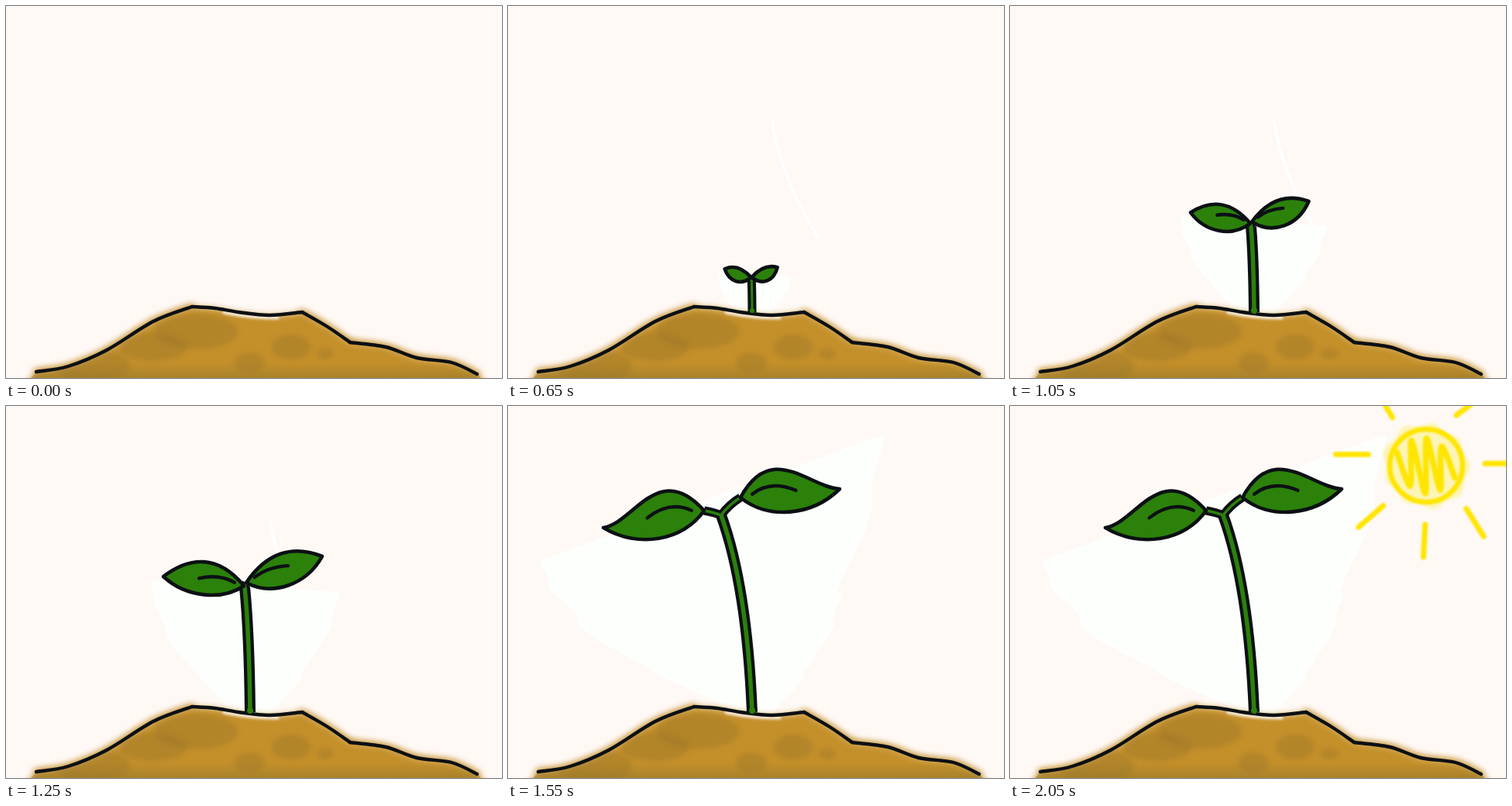
Animation, 640 px wide and 480 px high, one loop 3.05 s. Source, as an HTML page with a canvas:

```html
<!DOCTYPE html>
<html lang="en">
<head>
<meta charset="utf-8">
<title>Growing sprout</title>
<style>
html, body { margin: 0; width: 100%; height: 100%; overflow: hidden; background: #fff9f6; }
canvas { display: block; }
</style>
</head>
<body>
<canvas id="stage" width="640" height="480"></canvas>
<script>
const ctx = document.getElementById('stage').getContext('2d');
const LOOP = 3050, STEP = 100, START = 250;
const INK = '#0c1014', GREEN = '#2b810a', PAPER = '#fff9f6', WHITE = '#fdfffd';
const SOIL = '#c4902a', SUN = '#ffe500', PALE = '#fcf5b7';
const FOOT = [315, 395];

// top: end of the stem; leaf: base, tip, upper bulge near base and near tip, lower bulge;
// rub: the two upper corners of the paper rubbed clean behind the plant.
const sprout = at => ({ at, top: FOOT, left: [...FOOT, ...FOOT, 0, 0, 0],
  right: [...FOOT, ...FOOT, 0, 0, 0], rub: [...FOOT, ...FOOT] });
const poses = [
  sprout(225),
  { at: 850, top: [314, 336], left: [313,329, 263,313, 11, 14, 21],
    right: [314,329, 363,310, 10, 12, 22], rub: [256,321, 382,332] },
  { at: 1250, top: [308, 234], left: [307,232, 203,220, 36, 30, 23],
    right: [310,228, 408,194, 28, 27, 28], rub: [190,228, 424,244] },
  { at: 1450, top: [274, 179], left: [241,163, 130,182, 42, 18, 37],
    right: [297,155, 399,89, 41, 35, 47], rub: [150,190, 414,76] },
  { at: 1550, top: [275, 141], left: [253,135, 123,157, 75, -1, 34],
    right: [300,118, 428,107, 70, 5, 32], rub: [44,202, 478,42] }
];

// Slope, crest, drop and tail of the mound, meeting at corners.
const ridge = [
  [39,472, 80,465, 130,444, 190,407, 240,388],
  [240,388, 270,390, 300,395, 340,399, 382,395],
  [382,395, 415,414, 444,434],
  [444,434, 490,440, 530,454, 575,460, 608,475]
];
const spots = [[245,420,54], [368,440,25], [412,449,11], [314,460,20], [110,464,50], [190,440,44]];

const lerp = (a, b, k) => a + (b - a) * k;
const rand = n => Math.abs(Math.sin(n * 127.1 + 3) * 4375.5) % 1;

function poseAt(t) {
  const last = poses.length - 1;
  if (t >= poses[last].at) return poses[last];
  const i = poses.findIndex(p => p.at > t), a = poses[i - 1], b = poses[i];
  const k = (t - a.at) / (b.at - a.at);
  const mix = key => a[key].map((v, n) => lerp(v, b[key][n], k));
  return { top: mix('top'), left: mix('left'), right: mix('right'), rub: mix('rub') };
}

function stroke(path, color, width) {
  ctx.strokeStyle = color;
  ctx.lineWidth = width;
  ctx.stroke(path);
}

function fill(path, color) {
  ctx.fillStyle = color;
  ctx.fill(path);
}

function soft(radius, draw) {
  ctx.save();
  ctx.filter = `blur(${radius}px)`;
  draw();
  ctx.restore();
}

function quad(a, c, b) {
  const path = new Path2D();
  path.moveTo(...a);
  path.quadraticCurveTo(...c, ...b);
  return path;
}

function disc(x, y, rx, ry = rx) {
  const path = new Path2D();
  path.ellipse(x, y, rx, ry, 0, 0, 2 * Math.PI);
  return path;
}

// Curve through every point, added to the path.
function spline(path, p) {
  const n = p.length / 2;
  const at = (i, axis) => p[2 * Math.max(0, Math.min(n - 1, i)) + axis];
  const handle = (i, side) => [0, 1].map(a => at(i, a) + side * (at(i + 1, a) - at(i - 1, a)) / 6);
  path.lineTo(p[0], p[1]);
  for (let i = 1; i < n; i++) {
    path.bezierCurveTo(...handle(i - 1, 1), ...handle(i, -1), at(i, 0), at(i, 1));
  }
  return path;
}

// Ragged wedge from the two corners down to the foot.
function drawRub([lx, ly, rx, ry]) {
  const path = new Path2D(), rows = 12;
  const edge = (x, y, side, k) => {
    const foot = FOOT[0] + side * 18, reach = Math.abs(x - foot);
    const bow = reach * (.18 * Math.sin(Math.PI * k) + .09 * (rand(k * rows + side) - .5));
    path.lineTo(lerp(x, foot, k) + side * bow, lerp(y, FOOT[1], k));
  };
  for (let i = 0; i <= rows; i++) edge(lx, ly, -1, i / rows);
  for (let i = rows; i >= 0; i--) edge(rx, ry, 1, i / rows);
  path.closePath();
  fill(path, WHITE);
  ctx.save();
  ctx.lineJoin = 'round';
  stroke(path, WHITE, 8);
  ctx.restore();
}

function drawMound() {
  const body = new Path2D();
  for (const part of ridge) spline(body, part);
  body.lineTo(632, 500);
  body.lineTo(16, 500);
  body.closePath();
  soft(4, () => {
    fill(body, SOIL);
    ridge.forEach((part, i) => i !== 1 && stroke(spline(new Path2D(), part), SOIL, 7));
  });
  ctx.save();
  ctx.clip(body);
  soft(3, () => {
    for (const [x, y, r] of spots) fill(disc(x, y, r, r < 30 ? r * .65 : r * .42), 'rgba(150,114,42,.36)');
  });
  const shade = ctx.createLinearGradient(0, 460, 0, 482);
  shade.addColorStop(0, 'rgba(146,118,44,0)');
  shade.addColorStop(1, 'rgba(146,118,44,.6)');
  ctx.fillStyle = shade;
  ctx.fillRect(0, 460, 640, 20);
  soft(1.5, () => stroke(quad([282, 395], [315, 402], [350, 402]), '#f3e6d2', 5));
  ctx.restore();
  for (const part of ridge) stroke(spline(new Path2D(), part), INK, 4.4);
}

function drawLeaf([bx, by, tx, ty, near, far, low], veined) {
  const dx = tx - bx, dy = ty - by, len = Math.hypot(dx, dy) || 1, side = Math.sign(dx) || 1;
  // Point at a share of the midrib, raised at right angles to it.
  const at = (k, up) => [bx + dx * k + side * up * dy / len, by + dy * k - side * up * dx / len];
  const path = new Path2D();
  path.moveTo(bx, by);
  path.bezierCurveTo(...at(.36, near), ...at(.7, far), tx, ty);
  path.bezierCurveTo(...at(.7, -low), ...at(.25, -low), bx, by);
  path.closePath();
  fill(path, GREEN);
  stroke(path, INK, 4.6);
  if (veined) stroke(quad(at(.12, 3), at(.32, 4 + near * .22), at(.56, 3)), INK, 4.4);
}

function drawPlant(t) {
  const { top, left, right } = poseAt(t);
  const w = Math.min(14, 3 + (FOOT[1] - top[1]) * .2);
  const stem = quad(top, [lerp(top[0], FOOT[0], .83), lerp(top[1], FOOT[1], .36)], FOOT);
  const stalks = [left, right].map(([x, y]) =>
    quad(top, [lerp(top[0], x, .4), lerp(top[1], y, .6)], [x, y]));
  ctx.lineCap = 'butt';
  stroke(stem, INK, w);
  for (const s of stalks) stroke(s, INK, Math.min(w, 11));
  stroke(stem, GREEN, Math.max(w - 8.5, 3));
  for (const s of stalks) stroke(s, GREEN, 3.5);
  ctx.lineCap = 'round';
  fill(disc(FOOT[0], FOOT[1] - 2, w * .28), GREEN);
  drawLeaf(left, t > 850);
  drawLeaf(right, t > 850);
}

function drawSun(t) {
  const x = 537, y = 77;
  const polar = (angle, r) => [x + r * Math.cos(angle), y + r * Math.sin(angle)];
  const blob = new Path2D();
  for (let a = 0; a < 2 * Math.PI; a += .05) {
    blob.lineTo(...polar(a, 54 + 2.5 * Math.cos(9 * a) + 2 * Math.cos(2 * a - 1.4)));
  }
  soft(1.8, () => fill(blob, PALE));
  if (t < 1950) return;

  const scribble = [];
  for (let i = 0; i < 8; i++) {
    const down = i % 2 ? 1 : -1, swing = 12 + 24 * Math.sin(Math.PI * (i + .6) / 8);
    scribble.push(x - 34 + i * 9.6 + down * 4, y + down * swing);
  }
  soft(.8, () => {
    stroke(disc(x, y, 47), SUN, 6.5);
    stroke(spline(new Path2D(), scribble), SUN, 7.5);
    if (t < 2050) return;
    // Each ray: where it starts around the disc and where it heads, in degrees.
    for (const pair of [[191,180], [137,139], [91,93], [47,58], [-2,0], [-59,-37], [-125,-121]]) {
      const [start, head] = pair.map(d => d * Math.PI / 180), [sx, sy] = polar(start, 76);
      const ray = new Path2D();
      ray.moveTo(sx, sy);
      ray.lineTo(sx + 42 * Math.cos(head), sy + 42 * Math.sin(head));
      stroke(ray, SUN, 7);
    }
  });
}

function draw(t) {
  ctx.fillStyle = PAPER;
  ctx.fillRect(0, 0, 640, 480);
  ctx.lineCap = ctx.lineJoin = 'round';
  if (t >= START) {
    stroke(quad([341, 150], [352, 222], [400, 298]), '#ffffff', 4);
    for (const p of poses) if (p.at >= 850 && p.at < t) drawRub(p.rub);
    if (t > 450) drawRub(poseAt(t).rub);
  }
  drawMound();
  if (t >= START) drawPlant(t);
  if (t >= 1850) drawSun(t);
}

let shown = -1;
function tick() {
  const t = performance.now() % LOOP;
  const step = t < START ? 0 : START + Math.floor((t - START) / STEP) * STEP;
  if (step !== shown) draw(shown = step);
  requestAnimationFrame(tick);
}
tick();
</script>
</body>
</html>
```
